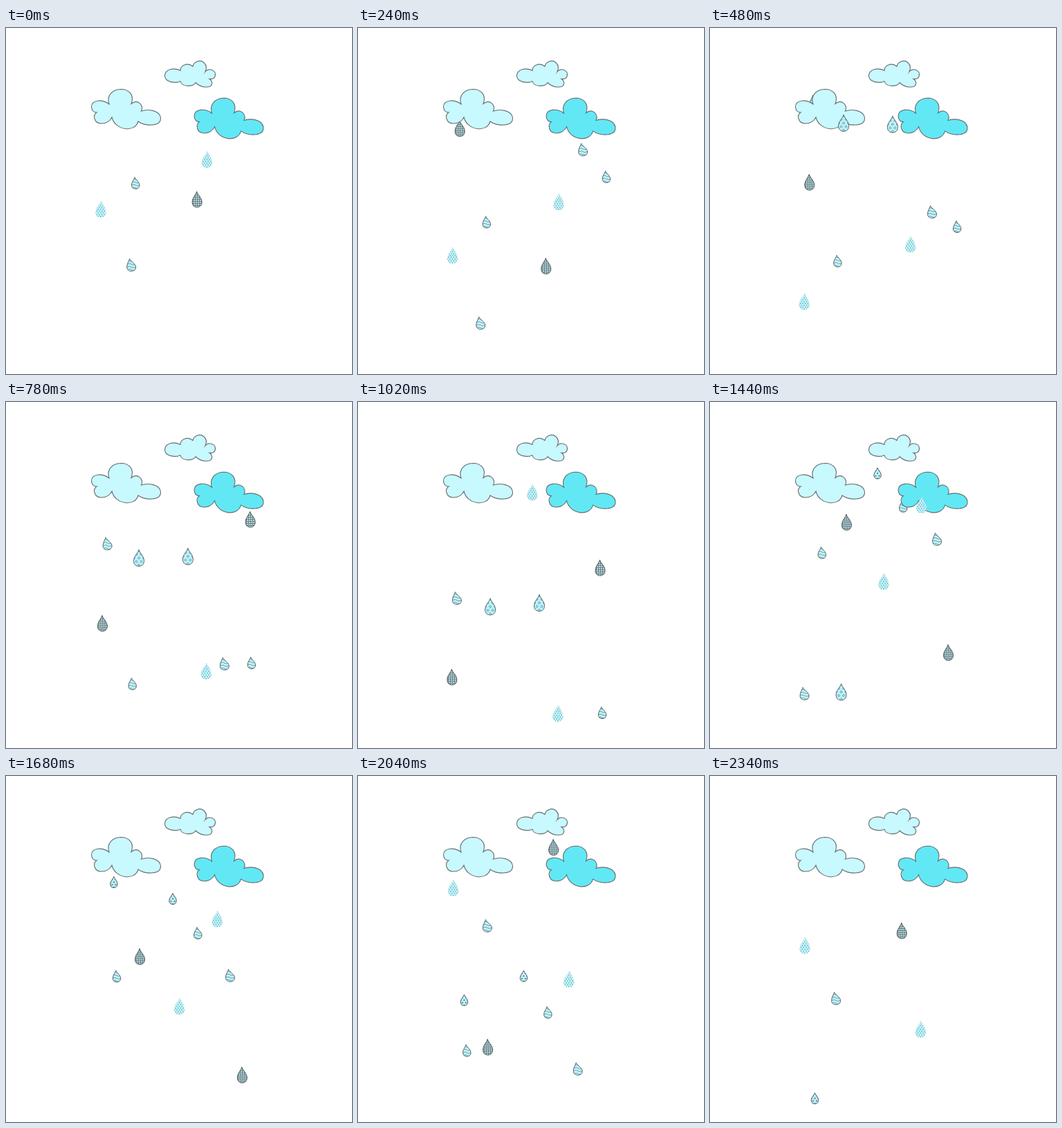
Recreate the animation shown at these times as an HTML page with a canvas. Size 500 by 500 pixels, loop 2.4 s.

```html
<!DOCTYPE html>
<html lang="en">
<head>
<meta charset="utf-8">
<title>Rain clouds</title>
<style>
html, body { margin: 0; width: 100%; height: 100%; overflow: hidden; background: #fff; }
canvas { display: block; width: 500px; height: 500px; }
</style>
</head>
<body>
<canvas id="stage" width="500" height="500"></canvas>
<script>
const ctx = document.getElementById('stage').getContext('2d');
const STEP = 60, STEPS = 40;
const TOP = 95, MIDDLE = 250, FLOOR = 455;

const wide = new Path2D(`M149 110 C140 103 124 103 123.5 114 C124 120 127 122 131 122
  C125 126 127 138 138 138 C146 138 151 133 153 129 C158 149 187 151 191 135
  C201 142 224 143 223.5 130 C222 118 204 117 195.5 120 C200 112 190 102 181 109.5
  C186 96 177 88.5 166 88.5 C153 89 145 98 149 110Z`);
const small = new Path2D(`M252 77 C246 80 229.5 79 229.5 69 C230 59 243 57 252 61.5
  C252 54 262 49 270 55.5 C271 49 280 45 286 50 C290 54 290 59 288 63
  C293 57 302.5 61 302.5 67 C302.5 73 298 74 294 73.5 C300 78 298 85 292 85
  C284 86 278 83 274 79 C272 85 254 86 252 77Z`);

function cloud(path, color, x = 0, y = 0, tall = 1) {
  ctx.save();
  ctx.translate(x, y);
  ctx.scale(1, tall);
  ctx.fillStyle = color;
  ctx.fill(path);
  ctx.strokeStyle = '#656e71';
  ctx.lineWidth = 1.1;
  ctx.stroke(path);
  ctx.restore();
}

function dropPath(w, h, tip) {
  const a = w / 2, b = h / 2;
  return new Path2D(`M${tip} ${-b} C${tip + a * .15} ${-b * .6} ${a} ${-b * .2} ${a} ${b * .35}
    C${a} ${b * .8} ${a * .5} ${b} 0 ${b} C${-a * .5} ${b} ${-a} ${b * .8} ${-a} ${b * .35}
    C${-a} ${-b * .2} ${tip - a * .15} ${-b * .6} ${tip} ${-b}Z`);
}

// Staggered dots over the drop's box
function dots(gap, r, color, ring) {
  ctx.fillStyle = ctx.strokeStyle = color;
  for (let row = -5; row <= 5; row++) {
    for (let col = -4; col <= 4; col++) {
      ctx.beginPath();
      ctx.arc((col + (row & 1) / 2) * gap, row * gap * .75, r, 0, 7);
      ring ? ctx.stroke() : ctx.fill();
    }
  }
}

function grid() {
  ctx.strokeStyle = '#6a7375';
  ctx.beginPath();
  for (let p = -12; p <= 12; p += 3) {
    ctx.moveTo(p, -14); ctx.lineTo(p + 1, 14);
    ctx.moveTo(-10, p); ctx.lineTo(10, p);
  }
  ctx.stroke();
}

function waves() {
  ctx.strokeStyle = '#5c8c98';
  ctx.beginPath();
  for (let y = -5; y <= 8; y += 4) {
    for (let x = -8; x <= 8; x++) {
      ctx[x > -8 ? 'lineTo' : 'moveTo'](x, y + Math.sin(x * .6) * .7 + x * .06);
    }
  }
  ctx.stroke();
}

// A drop falls in a straight line: step and x at mid height, speed, and where it ends
const drop = (at, x, speed, floor = FLOOR) => ({ at, x, speed, floor });

// drift: sideways shift per pixel fallen
const kinds = [
  { w: 13, h: 18, tip: -2.5, fill: '#c2f4fa', edge: '#56646a', pattern: waves, drift: -.046, behind: true,
    drops: [drop(35.6, 185.4, 21), drop(7.3, 321.7, 22.5), drop(15.3, 144.5, 19.7), drop(26.3, 325.7, 22.5)] },
  { w: 11.5, h: 17, tip: -1.2, fill: '#c2f4fa', edge: '#56646a', pattern: waves, drift: -.025, behind: true,
    drops: [drop(1.84, 186.6, 14.1), drop(5.94, 358, 18), drop(29.2, 276.7, 19.1, 435), drop(25.8, 161, 17.9)] },
  { w: 14, h: 23, tip: -.5, fill: '#b4e2e9', edge: '#50595c', pattern: grid, drift: -.045, behind: true,
    drops: [drop(40.1, 276, 24.1, 435), drop(9.4, 142.5, 19.4), drop(17.6, 349.5, 17.5), drop(27.5, 194, 21.8)] },
  { w: 15, h: 24, tip: .5, fill: '#c8f5fa', pattern: () => dots(3.6, .9, '#62b3c0'), drift: -.006,
    drops: [drop(3.92, 290, 15.3), drop(39.3, 137, 16.7), drop(23.5, 251, 18.4, 440), drop(31, 305, 14.5)] },
  { w: 15, h: 24, tip: 0, fill: '#bdf1f8', edge: '#56646a', pattern: () => dots(7, 1.4, '#5c98a6', true), drift: -.0125,
    drops: [drop(14.4, 191.7, 17.6), drop(14.6, 262.5, 16.8, 400)] },
  { w: 10.5, h: 16, tip: 0, fill: '#bdf1f8', edge: '#4f5d63', pattern: () => dots(5, 1.1, '#4f7b88'), drift: -.014,
    drops: [drop(31.9, 240, 18.6, 380), drop(31.4, 154.5, 28.4, 470)] }
];
for (const k of kinds) k.path = dropPath(k.w, k.h, k.tip);

function drawDrop(k, x, y) {
  ctx.save();
  ctx.translate(x, y);
  ctx.fillStyle = k.fill;
  ctx.fill(k.path);
  ctx.save();
  ctx.clip(k.path);
  ctx.lineWidth = .9;
  k.pattern();
  ctx.restore();
  if (k.edge) {
    ctx.strokeStyle = k.edge;
    ctx.lineWidth = 1;
    ctx.stroke(k.path);
  }
  ctx.restore();
}

function rain(step, behind) {
  for (const k of kinds) {
    if (!!k.behind !== behind) continue;
    for (const d of k.drops) {
      // Late drops carry over into the next loop
      const s = step < 10 && d.at > 35 ? step + STEPS : step;
      const fall = (s - d.at) * d.speed, y = MIDDLE + fall;
      if (y > TOP && y < d.floor) drawDrop(k, d.x + fall * k.drift, y);
    }
  }
}

function draw(step) {
  ctx.fillStyle = '#fff';
  ctx.fillRect(0, 0, 500, 500);
  rain(step, true);
  cloud(small, '#c8f9ff');
  cloud(wide, '#c8f9ff');
  cloud(wide, '#62e8f5', 148.5, 10.5, 1.025);
  rain(step, false);
}

const start = performance.now();
function tick() {
  draw(Math.floor((performance.now() - start) / STEP) % STEPS);
  requestAnimationFrame(tick);
}
draw(0);
requestAnimationFrame(tick);
</script>
</body>
</html>
```
